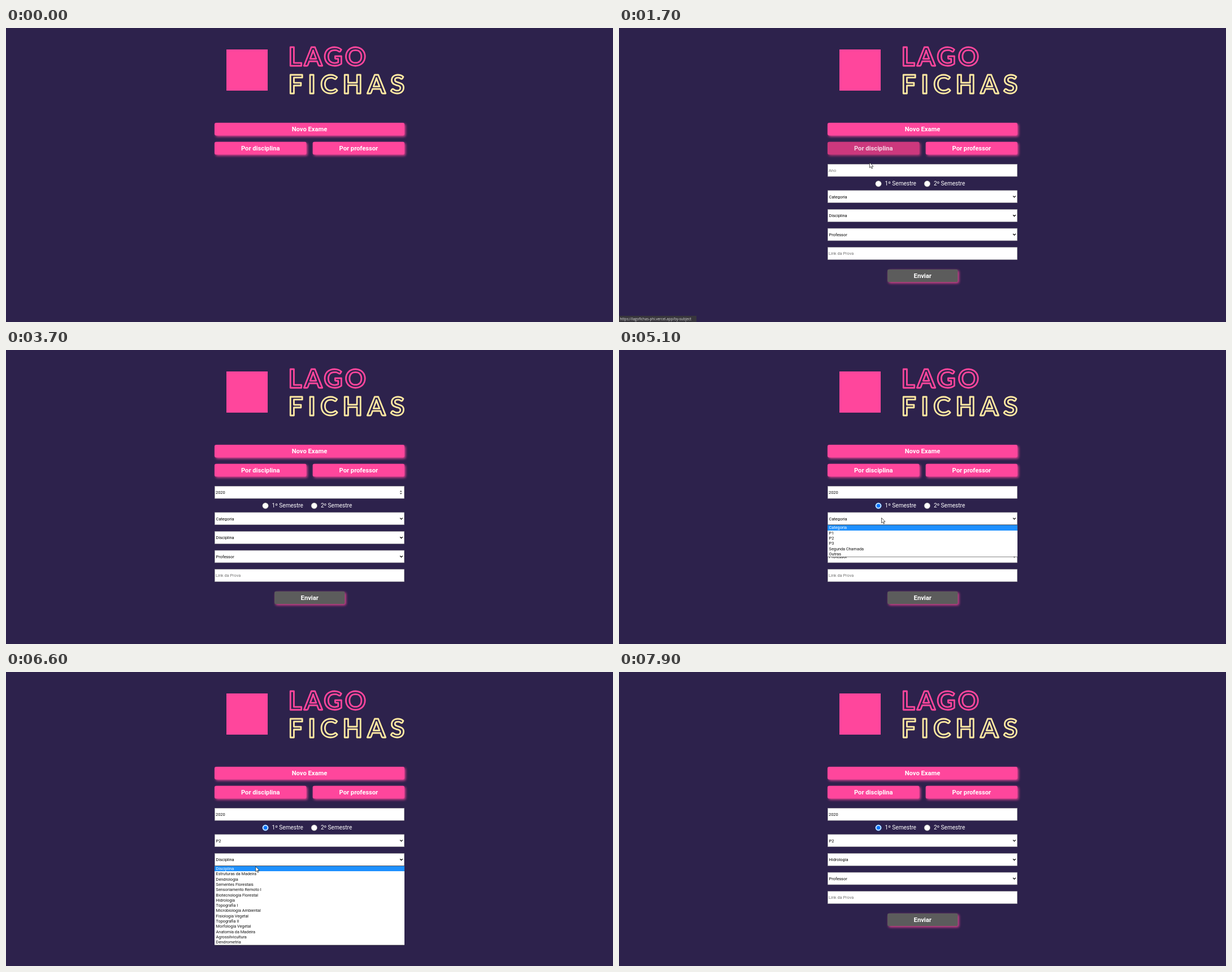
An HTML page for the animation above (8000 ms loop, 1074 by 521 pixels).

```html
<!DOCTYPE html>
<html lang="pt">
<head>
<meta charset="utf-8">
<title>Lago Fichas</title>
<style>
  html, body { margin: 0; height: 100%; overflow: hidden; background: #2d224c; }
  svg { display: block; width: 1074px; height: 521px; font: 7.4px Roboto, sans-serif; }
  .word { font: bold 46px Lato, sans-serif; fill: none; stroke-width: 2.8; stroke-linejoin: round; }
  .button { filter: drop-shadow(2px 2px 2px #ff469cdd); }
  .hover { filter: drop-shadow(2px 2px 2px #ff469cdd) brightness(.8); }
  .label { font-size: 11.19px; font-weight: bold; fill: #fff; text-anchor: middle; }
  .radio { font-size: 10.07px; fill: #fff; }
  .option { font-size: 7.3px; }
  .status { font: 6.3px "Open Sans", sans-serif; fill: #dcdcdc; }
</style>
</head>
<body>
<svg id="stage" viewBox="0 0 1074 521"></svg>
<script>
const LOOP = 8000, STEP = 100;
const LEFT = 369, WIDTH = 336, HEIGHT = 22.4, PITCH = 33.6, ROW = 9.3;
const FIRST = 287.6; // top of the first select
const PINK = '#ff469c', CREAM = '#ffe9a2';
const stage = document.getElementById('stage');

const categories = ['Categoria', 'P1', 'P2', 'P3', 'Segunda Chamada', 'Outras'];
const subjects = ['Disciplina', 'Estruturas da Madeira', 'Dendrologia', 'Sementes Florestais',
  'Sensoriamento Remoto I', 'Biotecnologia Florestal', 'Hidrologia', 'Topografia I',
  'Microbiologia Ambiental', 'Fisiologia Vegetal', 'Topografia II', 'Morfologia Vegetal',
  'Anatomia da Madeira', 'Agrossilvicultura', 'Dendrometria'];

// Pointer moves: start, end, x, y
const moves = [
  [0, 700, 463, 179],       // to "Novo Exame"
  [800, 900, 470, 178],
  [1400, 1800, 438.6, 249.7], // across "Por disciplina" to the year
  [2000, 3700, 456, 256],
  [3900, 4500, 459, 272],   // to the radio
  [4600, 5000, 464.5, 297.5], // to the category
  [5100, 5400, 450, 324],
  [5500, 5600, 446.5, 330.5],
  [6400, 6800, 437, 359],   // down the subjects
  [6900, 7300, 426, 396],
  [7400, 7600, 426, 403]
];

const between = (t, a, b) => t >= a && t < b;
const ease = k => k * k * (3 - 2 * k);

function pointerAt(t) {
  const p = { x: -14, y: -10 };
  for (const [start, end, x, y] of moves) {
    const k = ease(Math.min(1, Math.max(0, (t - start) / (end - start))));
    p.x += (x - p.x) * k;
    p.y += (y - p.y) * k;
  }
  return p;
}

const rect = (x, y, w, h, fill, more = '') =>
  `<rect x="${x}" y="${y}" width="${w}" height="${h}" fill="${fill}" ${more}/>`;
const text = (x, y, s, more = '') => `<text x="${x}" y="${y}" ${more}>${s}</text>`;

const inside = (p, y, w) => between(p.x, LEFT, LEFT + w) && between(p.y, y, y + HEIGHT);
const onNew = p => inside(p, 168, WIDTH);
const onSubject = p => inside(p, 201.8, 162.5);

function button(x, y, w, label, hover, fill = PINK) {
  return `<g class="${hover ? 'hover' : 'button'}">${rect(x, y, w, HEIGHT, fill, 'rx="2.8"')}</g>` +
    text(x + w / 2, y + 15.3, label, `class="label" opacity="${hover ? .8 : 1}"`);
}

const field = (y, s, color = '#757575') =>
  rect(LEFT + .3, y + .3, WIDTH - .6, HEIGHT - .6, '#fff', 'stroke="#9a9a9a" stroke-width=".6"') +
  text(371, y + 13.9, s, `fill="${color}"`);

function select(i, s) {
  const y = FIRST + i * PITCH;
  return field(y, '') + text(371.6, y + 14, s) +
    `<path d="M697.2 ${y + 10}l2.3 2.3 2.3-2.3" fill="none" stroke="#000" stroke-width="1.3"/>`;
}

function radio(x, label, checked) {
  return `<circle cx="${x}" cy="276" r="5.3" fill="#fff" stroke="${checked ? '#0075ff' : '#767676'}" stroke-width=".6"/>` +
    (checked ? `<circle cx="${x}" cy="276" r="3.5" fill="#0075ff"/>` : '') +
    text(x + 11.6, 279.2, label, 'class="radio"');
}

function menu(i, items, p) {
  const top = FIRST + i * PITCH + HEIGHT + .3, height = items.length * ROW;
  const active = Math.max(0, Math.floor((p.y - top) / ROW));
  return rect(LEFT, top, WIDTH, height + .5, '#fff') +
    rect(LEFT, top + active * ROW, WIDTH, ROW, '#1e90ff', 'shape-rendering="crispEdges"') +
    rect(LEFT, top - .6, WIDTH, .6, '#333') + rect(LEFT, top + height + .4, WIDTH, .6, '#333') +
    items.map((s, n) => text(371.6, top + n * ROW + 7.1, s,
      `class="option" fill="${n === active ? '#fff' : '#111'}"`)).join('');
}

function form(t, p) {
  const year = '2020'.slice(0, t < 2800 ? 0 : (t - 2400) / 200);
  const lastKey = t < 2800 ? 2100 : Math.min(t, 3200);
  const caret = between(t, 2100, 4400) && Math.floor((t - lastKey) / 500) % 2 === 0;
  return field(241, year || 'Ano', year ? '#111' : '#757575') +
    (caret ? rect(371 + year.length * 4.2, 247.5, .7, 9, '#000') : '') +
    (between(t, 1800, 4400) ? '<path d="M696.6 251.3l2.1-2.4 2.1 2.4zm0 2.1l2.1 2.4 2.1-2.4z" fill="#444"/>' : '') +
    radio(459, '1º Semestre', t >= 4400) + radio(545.3, '2º Semestre') +
    select(0, t < 6100 ? 'Categoria' : 'P2') +
    select(1, t < 7900 ? 'Disciplina' : 'Hidrologia') +
    select(2, 'Professor') + field(FIRST + 3 * PITCH, 'Link da Prova') +
    button(475, 427.8, 124.5, 'Enviar', false, '#5c5c5c') +
    (between(t, 5000, 6100) ? menu(0, categories, p) : '') +
    (between(t, 6600, 7900) ? menu(1, subjects, p) : '');
}

function status(t) {
  if (!between(t, 1100, 2000)) return '';
  const [page, width] = t < 1700 ? ['new', 113] : ['by-subject', 137];
  return rect(0, 510, width, 11, '#38363c') +
    text(1.5, 517.8, 'https://lagofichas-phi.vercel.app/' + page, 'class="status"');
}

function pointer(t, p) {
  if (!between(t, 100, 1800) && !between(t, 3800, 7900)) return '';
  const shape = t >= 3800 && p.y < 260 ? 'M0 0h3M1.5 0v9M0 9h3'
    : onNew(p) || onSubject(p)
    ? 'M2 0q1.2 0 1.2 1v3l4 .8q1 .4 .8 1.5l-.7 4.7h-4.2l-3-4q0-1 1-.8l.2.2v-5.4q0-1 .7-1z'
    : 'M0 0v9.2l2.1-2 1.5 3.4 1.5-.6-1.5-3.3h2.9z';
  return `<path transform="translate(${p.x} ${p.y})" d="${shape}" fill="#fff" stroke="#111" stroke-width=".7"/>`;
}

function scene(t) {
  const p = pointerAt(t), before = pointerAt(t - STEP); // hover lags one step
  return rect(0, 0, 1074, 521, '#2d224c') +
    rect(390, 38, 73, 73, PINK) +
    text(499.5, 66.6, 'LAGO', `class="word" stroke="${PINK}" letter-spacing="4"`) +
    text(499.5, 116.2, 'FICHAS', `class="word" stroke="${CREAM}" letter-spacing="8.6"`) +
    button(LEFT, 168, WIDTH, 'Novo Exame', onNew(before)) +
    button(LEFT, 201.8, 162.5, 'Por disciplina', onSubject(before)) +
    button(542.7, 201.8, 162.3, 'Por professor') +
    (t >= 1100 ? form(t, p) : '') + status(t) + pointer(t, p);
}

let shown = -1;
function draw() {
  const t = Math.floor(performance.now() % LOOP / STEP) * STEP;
  if (t !== shown) stage.innerHTML = scene(shown = t);
  requestAnimationFrame(draw);
}
draw();
</script>
</body>
</html>
```
